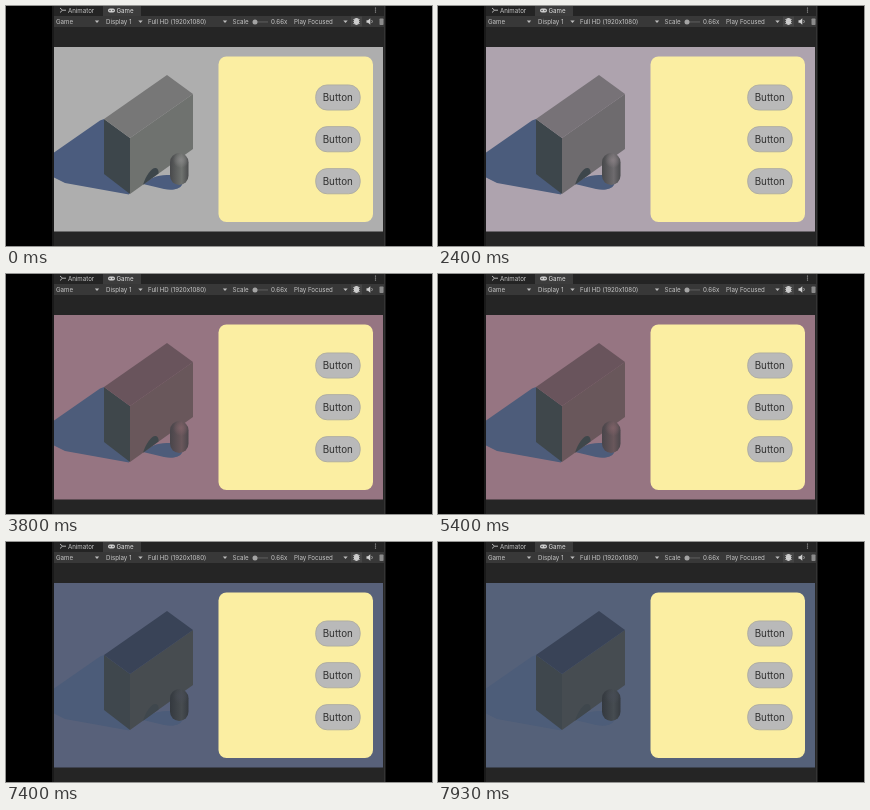
Write an HTML page with a canvas that moves like this. It is 426 px wide and 240 px high and loops after 8 s.

```html
<!DOCTYPE html>
<html lang="en">
<head>
<meta charset="utf-8">
<title>Day cycle in game view</title>
<style>
  html, body { margin: 0; width: 100%; height: 100%; overflow: hidden; background: #000; }
  canvas { display: block; width: 426px; height: 240px; }
</style>
</head>
<body>
<canvas id="stage" width="426" height="240"></canvas>
<script>
const ctx = document.getElementById('stage').getContext('2d');
const LOOP = 8000;

// Each light: ground, shadow, top, left, right, capsule light, capsule dark
const parts = ['ground', 'shadow', 'top', 'left', 'right', 'capLight', 'capDark'];
const light = text => text.split(' ').map(hex =>
  [0, 2, 4].map(i => parseInt(hex.slice(i, i + 2), 16)));
const mix = (a, b, k) => a.map((rgb, i) => rgb.map((v, c) => v + (b[i][c] - v) * k));

const day = light('aeaeae 4b5c7e 777777 3d464b 6f726f 858585 48494b');
const haze = light('aea3ae 4b5c7c 777277 3d464b 6e6b6e 857d81 48494b');
const fading = light('948a93 4b5c7a 6b646a 3d464b 646063 78696e 454548');
const dusk = light('967582 4d5c7a 69545c 3f474b 69575b 7c6066 49454a');
const late = light('58617a 4c5c79 394357 3f474d 474c50 474b54 34393f');
const night = light('556179 4d5d79 394357 3f474d 464c51 464b54 34393f');

const track = [
  [0, day], [1930, day], [2400, haze], [2725, haze],
  [2730, fading], [3530, dusk], [6000, dusk],
  [6730, mix(dusk, late, 0.25)], [7065, mix(dusk, late, 0.25)],
  [7070, mix(dusk, late, 0.6)], [7400, late], [7670, late], [7930, night], [LOOP, night]
];

function lightAt(t) {
  const i = track.findIndex(key => key[0] > t);
  const [t0, a] = track[i - 1], [t1, b] = track[i];
  const now = mix(a, b, (t - t0) / (t1 - t0));
  return Object.fromEntries(parts.map((name, n) =>
    [name, `rgb(${now[n].map(Math.round).join(',')})`]));
}

function rect(x, y, w, h, color) {
  ctx.fillStyle = color;
  ctx.fillRect(x, y, w, h);
}

function poly(points, color) {
  ctx.fillStyle = color;
  ctx.beginPath();
  points.forEach(p => ctx.lineTo(...p));
  ctx.closePath();
  ctx.fill();
}

function round(x, y, w, h, r, color, border) {
  ctx.beginPath();
  ctx.roundRect(x, y, w, h, r);
  ctx.fillStyle = color;
  ctx.fill();
  if (!border) return;
  ctx.strokeStyle = border;
  ctx.lineWidth = 0.8;
  ctx.stroke();
}

function disc(x, y, r, color) {
  ctx.fillStyle = color;
  ctx.beginPath();
  ctx.arc(x, y, r, 0, Math.PI * 2);
  ctx.fill();
}

function line(points, color, width) {
  ctx.strokeStyle = color;
  ctx.lineWidth = width;
  ctx.beginPath();
  points.forEach(p => ctx.lineTo(...p));
  ctx.stroke();
}

function label(text, x, y, size = 6.15, color = '#c6c6c6') {
  ctx.font = `${size}px Inter, sans-serif`;
  ctx.textBaseline = 'alphabetic';
  ctx.fillStyle = color;
  ctx.fillText(text, x, y);
}

function drawEditor() {
  rect(0, 0, 426, 240, '#000');
  rect(46, 0, 334, 240, '#191919');
  rect(48, 0, 330, 10, '#242424');
  rect(97, 0, 38, 11, '#3c3c3c');
  rect(48, 10, 330, 11, '#383838');
  rect(48, 21, 330, 219, '#252525');
  rect(378, 0, 1, 240, '#343434');

  line([[54, 2], [56.5, 4.2], [54, 6.5]], '#c6c6c6', 0.9);
  line([[56.5, 4.2], [60, 4.2]], '#c6c6c6', 0.9);
  label('Animator', 62, 6.6);
  round(102, 2.6, 7, 4, 2, '#d2d2d2');
  disc(104, 4.5, 0.7, '#3c3c3c');
  disc(107, 4.5, 0.7, '#3c3c3c');
  label('Game', 110.5, 6.6, 6.15, '#dedede');
  for (const y of [2, 4, 6]) disc(369.5, y, 0.6, '#c0c0c0');

  label('Game', 50, 17.8);
  label('Display 1', 100, 17.8);
  label('Full HD (1920x1080)', 142, 17.8);
  label('Scale', 226.5, 17.8);
  label('0.66x', 265, 17.8);
  label('Play Focused', 288, 17.8);
  for (const x of [91, 134.5, 219, 339.5])
    poly([[x - 2.2, 14.5], [x + 2.2, 14.5], [x, 17]], '#bdbdbd');
  rect(248, 15.5, 14, 0.9, '#626262');
  disc(249, 15.9, 2.5, '#a4a4a4');

  rect(345, 10.5, 11, 10, '#454545');
  round(348, 12, 5, 7, 2.4, '#d0d0d0');
  for (const y of [13.5, 15.5, 17.5]) line([[347, y], [354, y]], '#c4c4c4', 0.6);
  poly([[360.5, 14.3], [362, 14.3], [364.3, 12.3], [364.3, 18.7], [362, 16.7], [360.5, 16.7]], '#d0d0d0');
  line([[365.6, 14], [366.4, 15.5], [365.6, 17]], '#c4c4c4', 0.7);
  round(373.5, 12.5, 4, 6.5, 0.8, '#8c8c8c');
}

function drawScene(c) {
  rect(48, 41, 329, 184.5, c.ground);

  poly([[98, 113], [94, 114.5], [48, 146.5], [48, 171.5], [59, 177], [123, 188.5], [128, 170]], c.shadow);
  ctx.fillStyle = c.shadow;
  ctx.beginPath();
  ctx.moveTo(137, 178);
  ctx.bezierCurveTo(144, 171, 158, 166, 173, 171);
  ctx.bezierCurveTo(182, 179, 172, 186, 158, 183);
  ctx.closePath();
  ctx.fill();

  poly([[98, 113], [124, 132], [124, 188], [98, 168]], c.left);
  poly([[124, 132], [187, 88], [187, 143], [124, 188]], c.right);
  poly([[98, 113], [161, 69], [187, 88], [124, 132]], c.top);

  // Capsule shadow climbing the wall
  ctx.fillStyle = c.left;
  ctx.beginPath();
  ctx.moveTo(137, 178.7);
  ctx.bezierCurveTo(140, 169, 146, 161, 150, 162);
  ctx.quadraticCurveTo(153, 163, 152.5, 167.6);
  ctx.closePath();
  ctx.fill();

  const body = ctx.createLinearGradient(164, 0, 183, 0);
  body.addColorStop(0, c.capDark);
  body.addColorStop(0.62, c.right);
  body.addColorStop(1, c.capDark);
  round(164, 147, 18.5, 32, 9.2, body);
  const glow = ctx.createRadialGradient(175, 154, 0, 175, 154, 8);
  glow.addColorStop(0, c.capLight);
  glow.addColorStop(1, c.capLight.replace('rgb', 'rgba').replace(')', ',0)'));
  round(164, 147, 18.5, 32, 9.2, glow);
}

function drawMenu() {
  round(212.5, 50.5, 154.5, 165.5, 8, '#fbeea2');
  ctx.textAlign = 'center';
  for (const y of [91.5, 133.2, 175.2]) {
    round(309.7, y - 12.6, 44.5, 25.2, 11.5, '#b9b9b9', '#aaa99f');
    label('Button', 331.8, y + 3.6, 9.8, '#303030');
  }
  ctx.textAlign = 'left';
}

function frame(now) {
  drawEditor();
  drawScene(lightAt((now - start) % LOOP));
  drawMenu();
  requestAnimationFrame(tick);
}

const start = performance.now();
const tick = () => frame(performance.now());
tick();
</script>
</body>
</html>
```
